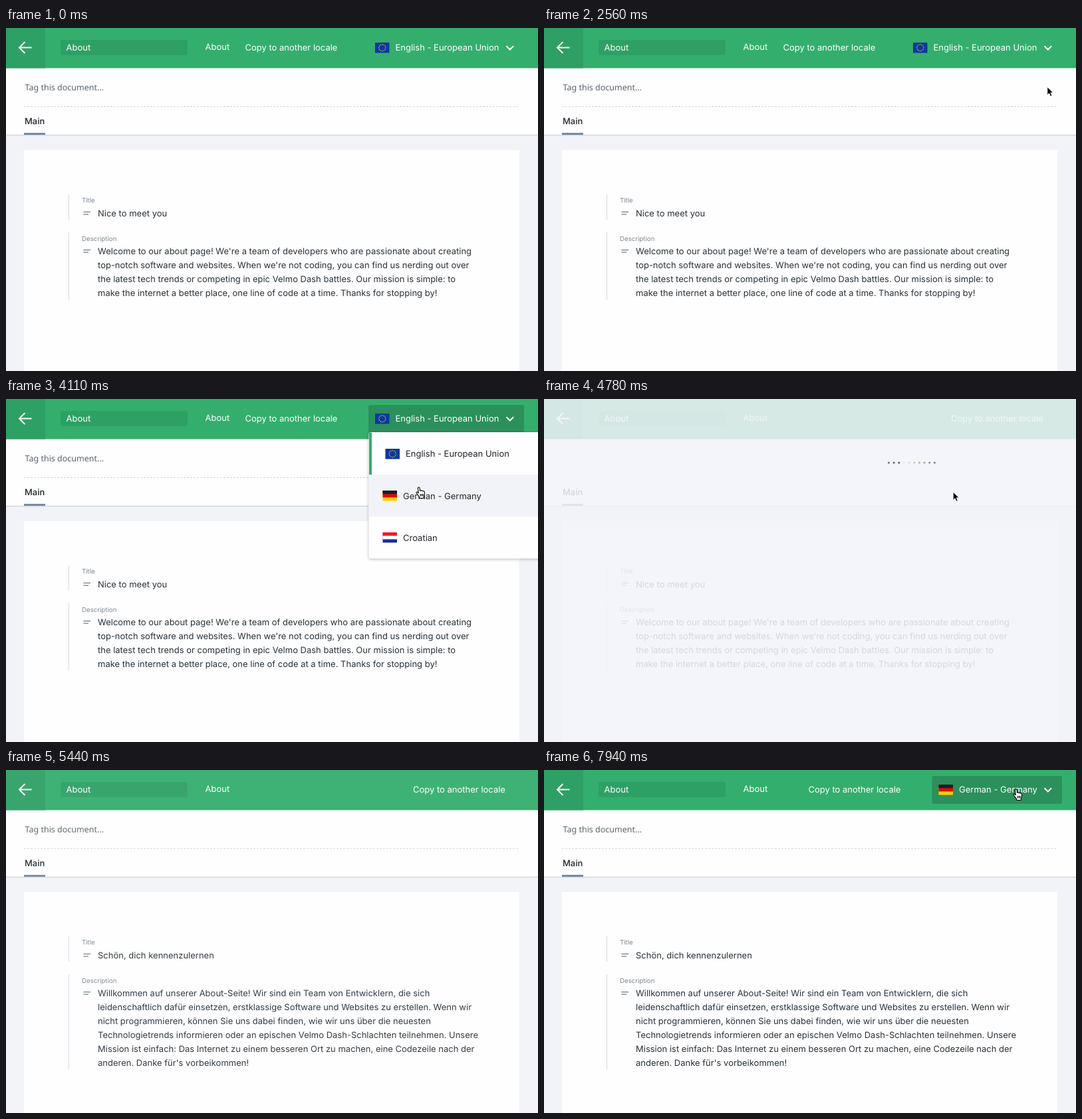
These frames come from a looping animation (800x517 px, 8 s). An HTML page:

```html
<!DOCTYPE html>
<html lang="en">
<head>
<meta charset="utf-8">
<title>Locale switch</title>
<style>
  html, body { margin: 0; width: 100%; height: 100%; overflow: hidden; background: #f1f3f8; }
  svg { display: block; font: 13px Inter, sans-serif; text-rendering: geometricPrecision; }
  .head text { fill: #fff; }
  .body { fill: #28323d; }
  .label { font-size: 9.7px; fill: #7d8896; }
  .tag { font: 500 12.5px "Noto Sans", sans-serif; fill: #59636f; }
  .bar { stroke: #d8dbe2; }
  .icon { stroke: #6c7c8c; stroke-width: 1.3; }
  .line { fill: none; stroke: #fff; stroke-width: 2; }
  .menu { filter: drop-shadow(0 1px 2px #0004); fill: #20252d; }
</style>
</head>
<body>
<svg width="800" height="517" viewBox="0 0 800 517">
  <defs>
    <g id="eu">
      <rect width="21.5" height="15.5" fill="#0a38a0"/>
      <circle cx="10.75" cy="7.75" r="5" fill="none" stroke="#e9d32b" stroke-width="1.5" stroke-linecap="round" pathLength="12" stroke-dasharray="0 1"/>
    </g>
    <g id="de">
      <rect width="21.5" height="15.5" fill="#ffce00"/>
      <rect width="21.5" height="10.4" fill="#dd0a0a"/>
      <rect width="21.5" height="5.2" fill="#1d1d25"/>
    </g>
    <g id="hr">
      <rect width="21.5" height="15.5" fill="#1d2a9c"/>
      <rect width="21.5" height="10.4" fill="#fff"/>
      <rect width="21.5" height="5.2" fill="#f01c24"/>
    </g>
    <path id="icon" class="icon" d="M116.5 0H127M116.5 3.500h7.500"/>
  </defs>

  <rect width="800" height="517" fill="#f1f3f8"/>
  <rect y="60" width="800" height="101" fill="#fefdff"/>
  <path d="M0 161.500h800" stroke="#d2d7de" stroke-width="1.600"/>
  <rect x="27" y="184" width="745" height="333" fill="#fefdff"/>

  <g class="head">
    <rect width="800" height="60.500" fill="#34ae6d"/>
    <rect width="59" height="60.500" fill="#2ea065"/>
    <rect x="82" y="18" width="191" height="23" rx="3" fill="#2ea065"/>
    <path class="line" d="M38.500 29.500H20.500M28.500 21L20 29.500l8.500 8.500"/>
    <text x="90.500" y="34.300">About</text>
    <text x="299.500" y="33">About</text>
    <text id="copy" y="34.300">Copy to another locale</text>
    <g id="locale">
      <rect id="button" y="9" height="42" rx="3" fill="#2b905c"/>
      <use id="flag" x="10" y="22"/>
      <text id="name" x="40.500" y="34.300"></text>
    </g>
    <path id="chevron" class="line" d="M752.500 27.200l5.300 5.300 5.300-5.300"/>
  </g>

  <g id="tags">
    <text class="tag" x="28.500" y="94">Tag this document...</text>
    <path d="M27 118.500h745" stroke="#d5d9de" stroke-dasharray="3 2"/>
  </g>
  <text x="28" y="144.500" font-weight="500" fill="#1f2730">Main</text>
  <rect x="27" y="158" width="32" height="3" fill="#768ba4"/>

  <path class="bar" d="M94.500 251v38"/>
  <path id="bar" class="bar"/>
  <text class="label" x="114" y="263">Title</text>
  <text class="label" x="114" y="320.500">Description</text>
  <use href="#icon" y="277.300"/>
  <use href="#icon" y="334.700"/>
  <g id="content" class="body"></g>

  <rect id="veil" width="800" height="517" fill="#f1f4f9"/>
  <g id="dots" fill="#4c6175"></g>

  <g id="menu" class="menu">
    <rect x="545.500" y="50" width="270" height="190.500" rx="3" fill="#fefdff"/>
    <rect id="hover" x="545.500" width="270" height="63.500" fill="#f1f3f8"/>
    <rect x="546" y="50.500" width="4" height="63.500" fill="#34ae6d"/>
    <use href="#eu" x="570.500" y="75"/><text x="601" y="87">English - European Union</text>
    <use href="#de" x="566.500" y="138"/><text x="597" y="150.500">German - Germany</text>
    <use href="#hr" x="566.500" y="201"/><text x="597" y="213.500">Croatian</text>
  </g>

  <g id="cursor">
    <path id="arrow" d="M0 0v12.500l2.900-2.700 2 4.600 2.300-1-2-4.500h4z" fill="#000" stroke="#fff" stroke-width="1"/>
    <path id="hand" d="M-1.600 1.200C-1.600-.4.900-.6 1.100 1.200L1.700 5.500c.4-1 2-.9 2.300.2.500-.9 2-.7 2.300.5.700-.7 2-.2 2.100 1 .3 2.800 0 5-1.200 7.400v1.900H.7v-1.700C-.8 12.500-2.300 11-3.700 8.800c-.9-1.600.9-2.500 2.200-.9l.8.900z M2.200 10v3.500M4.200 10v3.500M6 10v3.500" fill="#fff" stroke="#000" stroke-width="1.100" stroke-linejoin="round"/>
  </g>
</svg>
<script>
const LOOP = 8000, OPEN = 3300, PICK = 4250, SWAP = 4900, READY = 5540;
const el = Object.fromEntries([...document.querySelectorAll('svg [id]')].map(n => [n.id, n]));
const clamp = v => Math.max(0, Math.min(1, v));
const set = (node, attrs) => { for (const k in attrs) node.setAttribute(k, attrs[k]); };
const show = (node, on) => set(node, { visibility: on ? 'visible' : 'hidden' });

const pages = [
  {
    flag: '#eu', name: 'English - European Union', left: 545, copy: 359.5, title: 'Nice to meet you',
    lines: [
      "Welcome to our about page! We're a team of developers who are passionate about creating",
      "top-notch software and websites. When we're not coding, you can find us nerding out over",
      'the latest tech trends or competing in epic Velmo Dash battles. Our mission is simple: to',
      'make the internet a better place, one line of code at a time. Thanks for stopping by!'
    ]
  },
  {
    flag: '#de', name: 'German - Germany', left: 583.5, copy: 397.5, title: 'Schön, dich kennenzulernen',
    lines: [
      'Willkommen auf unserer About-Seite! Wir sind ein Team von Entwicklern, die sich',
      'leidenschaftlich dafür einsetzen, erstklassige Software und Websites zu erstellen. Wenn wir',
      'nicht programmieren, können Sie uns dabei finden, wie wir uns über die neuesten',
      'Technologietrends informieren oder an epischen Velmo Dash-Schlachten teilnehmen. Unsere',
      'Mission ist einfach: Das Internet zu einem besseren Ort zu machen, eine Codezeile nach der',
      "anderen. Danke für's vorbeikommen!"
    ]
  }
];

// Pointer tip as [time, x, y]
const trail = [
  [2330, 803, 128], [2560, 757, 89], [2720, 722, 56], [2900, 697, 36], [3110, 688, 29],
  [3450, 688, 29], [3650, 665, 70], [3850, 630, 124], [4110, 621, 133], [4400, 619, 136],
  [4780, 615, 140], [4950, 640, 138], [5300, 815, 110],
  [7360, 803, 78], [7550, 758, 57], [7750, 724, 36], [7940, 710, 29], [8000, 710, 29]
];

const dots = Array.from({ length: 10 }, (_, i) => {
  const dot = document.createElementNS('http://www.w3.org/2000/svg', 'circle');
  set(dot, { cx: 518.5 + i * 7.65, cy: 96, r: 1.6 });
  return el.dots.appendChild(dot);
});

function pointer(t) {
  const i = trail.findIndex(p => p[0] > t);
  if (i < 1) return [900, 300];
  const [a, b] = [trail[i - 1], trail[i]];
  const k = (t - a[0]) / (b[0] - a[0]);
  return [1, 2].map(n => a[n] + (b[n] - a[n]) * k);
}

let current;
function fill(page) {
  if (page === current) return;
  current = page;
  el.content.innerHTML = `<text x="138" y="283.5">${page.title}</text>` +
    page.lines.map((s, i) => `<text x="138" y="${341 + i * 21}">${s}</text>`).join('');
  set(el.bar, { d: `M94.5 308v${page.lines.length * 21 + 17.5}` });
  set(el.locale, { transform: `translate(${page.left})` });
  set(el.button, { width: 779 - page.left });
  set(el.flag, { href: page.flag });
  el.name.textContent = page.name;
}

function draw(t) {
  const page = pages[t < SWAP ? 0 : 1];
  const loading = t >= PICK && t < READY;
  const open = t >= OPEN && t < PICK;
  const [x, y] = pointer(t);
  const onButton = !loading && x > page.left && x < 779 && y > 9 && y < 51;
  const onMenu = open && x > 545 && y > 50;

  fill(page);
  set(el.copy, { x: loading ? 612 : page.copy });
  show(el.locale, !loading);
  show(el.chevron, !loading);
  set(el.button, { opacity: onButton || open ? 1 : 0 });
  show(el.tags, t < PICK || t >= SWAP);

  show(el.menu, open);
  set(el.hover, { y: 50.5 + 63.5 * Math.floor((y - 50.5) / 63.5), opacity: onMenu ? 1 : 0 });

  set(el.veil, { opacity: t < SWAP ? clamp((t - PICK) / 620) : clamp((5470 - t) / 570) });
  set(el.dots, { opacity: t < SWAP ? clamp((t - PICK - 50) / 200) : 0 });
  const head = (t - 4780) / 100 + 2;
  dots.forEach((dot, i) => {
    const lag = ((head - i) % 10 + 10) % 10;
    set(dot, { opacity: clamp(1.08 - lag / 9) });
  });

  set(el.cursor, { transform: `translate(${x} ${y})` });
  const hand = onButton || onMenu;
  set(el.hand, { opacity: hand ? 1 : 0 });
  set(el.arrow, { opacity: hand ? 0 : 1 });
}

function frame() {
  draw(performance.now() % LOOP);
  requestAnimationFrame(frame);
}
frame();
</script>
</body>
</html>
```
